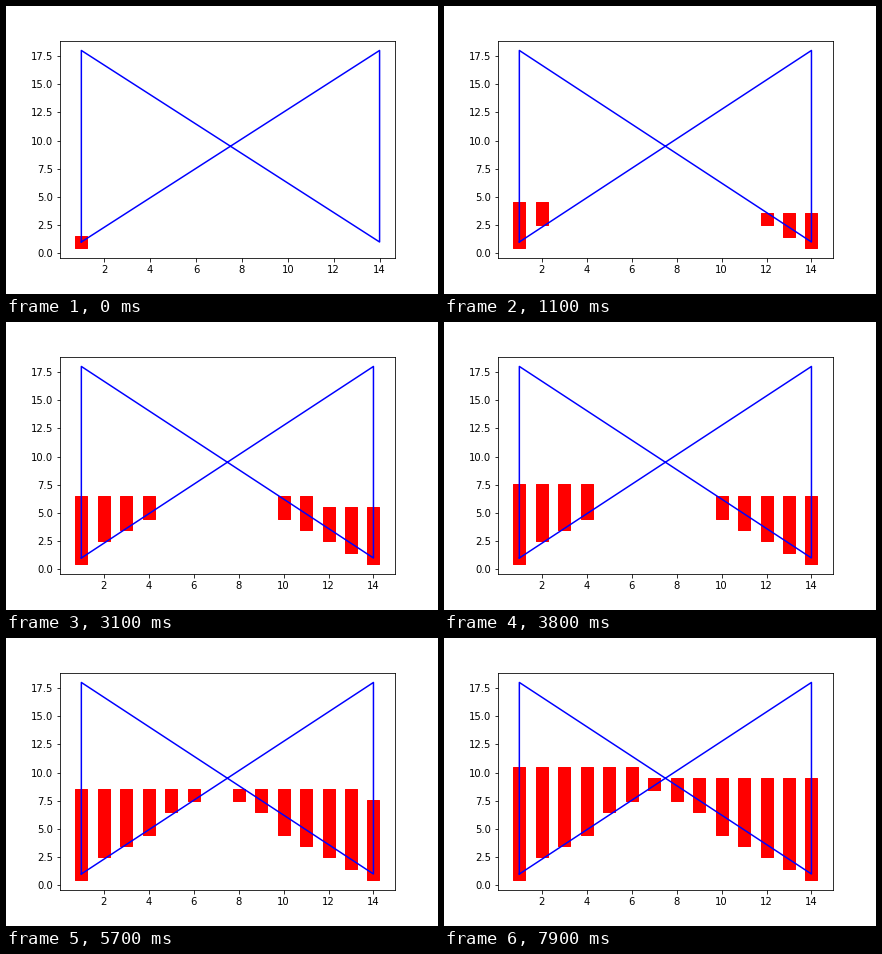
These frames come from a looping animation (432x288 px, 8 s). A matplotlib script:

```python
import math

import matplotlib.pyplot as plt
from matplotlib.animation import FuncAnimation

FRAMES, STEP_MS = 80, 100
CORNERS = [(1, 1), (14, 18), (14, 1), (1, 18)]
MARKER_AREA = 150
HALF = math.sqrt(MARKER_AREA) / 2
MARGIN = 0.05

outline = CORNERS + CORNERS[:1]


def crossings(y):
    """Whole-pixel x positions where a scanline meets the polygon's edges."""
    xs = []
    for (x0, y0), (x1, y1) in zip(outline, outline[1:]):
        if min(y0, y1) <= y <= max(y0, y1):
            xs.append(x0 + (y - y0) * (x1 - x0) / (y1 - y0))
    return sorted(int(x + 1e-9) for x in xs)


def scanline_fill():
    for y in range(1, 19):
        xs = crossings(y)
        for left, right in zip(xs[::2], xs[1::2]):
            for x in range(left, right + 1):
                yield x, y


def limits(lo, hi, pixels, before, after):
    """Axis limits with the usual margin plus room for markers at either end."""
    unit = (pixels / (1 + 2 * MARGIN) - before - after) / (hi - lo)
    edge = pixels * MARGIN / (1 + 2 * MARGIN)
    return lo - (edge + before) / unit, hi + (edge + after) / unit


points = list(scanline_fill())[:FRAMES]

plt.rcParams["font.family"] = "DejaVu Sans"
fig, ax = plt.subplots(figsize=(6, 4), dpi=72)
fig.subplots_adjust(left=0.125, right=0.9, bottom=0.125, top=0.88)
width, height = 432 * 0.775, 288 * 0.755

ax.plot(*zip(*outline), color="blue", linewidth=1.5)
pixels = ax.scatter([], [], s=MARKER_AREA, c="red", marker="s", linewidths=1)
ax.set_ylim(limits(1, 18, height, HALF, 0))


def update(i):
    shown = points[:i + 1]
    pixels.set_offsets(shown)
    reached_right = any(x == 14 for x, _ in shown)
    ax.set_xlim(limits(1, 14, width, HALF, HALF if reached_right else 0))
    return [pixels]


anim = FuncAnimation(fig, update, frames=FRAMES, interval=STEP_MS,
                     init_func=lambda: update(0), repeat=True, repeat_delay=0)
plt.show()
```
